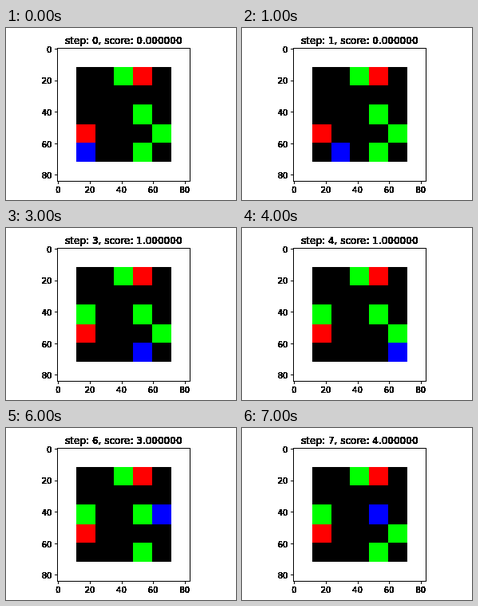
Recreate the animation shown at these times as an HTML page. Size 288 by 216 pixels, loop 8 s.

```html
<!DOCTYPE html>
<html lang="en">
<head>
<meta charset="utf-8">
<title>Grid world</title>
<style>
  html, body { margin: 0; width: 100%; height: 100%; overflow: hidden; background: #fff; }
  svg { display: block; width: 288px; height: 216px; }
  text { font: 10px "DejaVu Sans", sans-serif; fill: #000; }
  #title { font-size: 12px; }
  .text { filter: url(#solid); }
  .cell, .line { shape-rendering: crispEdges; }
  .line { fill: none; stroke: #000; }
</style>
</head>
<body>
<svg viewBox="0 0 288 216">
  <!-- Turns soft glyph edges into solid black. -->
  <filter id="solid" filterUnits="userSpaceOnUse" x="0" y="0" width="288" height="216">
    <feComponentTransfer><feFuncA type="linear" slope="30" intercept="-1"/></feComponentTransfer>
  </filter>
  <rect class="cell" x="88" y="49" width="119" height="119"/>
  <g id="cells"></g>
  <g id="axes"><rect class="line" x="64.5" y="25.5" width="166" height="167"/></g>
  <g id="labels" class="text">
    <text id="title" x="147.3" y="20" text-anchor="middle"></text>
  </g>
</svg>
<script>
const STEP_MS = 1000;
const UNIT = 1.98;
const colEdges = [88, 112, 135, 159, 183, 207];
const rowEdges = [49, 72, 96, 121, 144, 168];
const path = [[0, 4], [1, 4], [2, 4], [3, 4], [4, 4], [4, 3], [4, 2], [3, 2]];
const food = [[2, 0], [3, 2], [4, 3], [3, 4]];
const spawns = [[0, 2], [4, 2], [3, 4], [4, 3]];
const hazards = [[3, 0], [0, 3]];

const byId = id => document.getElementById(id);
const title = byId("title"), cells = byId("cells");
const axes = byId("axes"), labels = byId("labels");

function add(parent, tag, attrs, text = "") {
  const node = document.createElementNS("http://www.w3.org/2000/svg", tag);
  for (const key in attrs) node.setAttribute(key, attrs[key]);
  node.textContent = text;
  parent.append(node);
}

function drawCell([col, row], fill) {
  const x = colEdges[col], y = rowEdges[row];
  add(cells, "rect", {
    class: "cell", x, y, fill,
    width: colEdges[col + 1] - x, height: rowEdges[row + 1] - y
  });
}

function drawTicks() {
  for (let v = 0; v <= 80; v += 20) {
    const x = 65.43 + v * UNIT, y = 26.91 + v * UNIT;
    const tx = Math.round(x) + .5, ty = 215.5 - Math.round(216 - y);
    add(axes, "path", { class: "line", d: `M${tx} 192v4M65 ${ty}h-4` });
    add(labels, "text", { x, y: 207, "text-anchor": "middle" }, v);
    add(labels, "text", { x: 57.4, y: Math.round(y + 3.8), "text-anchor": "end" }, v);
  }
}

// Each meal scores a point and spawns the next piece of food.
let score = 0;
const states = path.map(agent => {
  const eaten = food.findIndex(f => String(f) === String(agent));
  if (eaten >= 0) food[eaten] = spawns[score++];
  return { agent, score, food: [...food] };
});

let shown = -1;
function render(time) {
  const step = Math.floor(time / STEP_MS) % states.length;
  if (step !== shown) {
    shown = step;
    const state = states[step];
    title.textContent = `step: ${step}, score: ${state.score.toFixed(6)}`;
    cells.replaceChildren();
    state.food.forEach(f => drawCell(f, "#0f0"));
    hazards.forEach(h => drawCell(h, "#f00"));
    drawCell(state.agent, "#00f");
  }
  requestAnimationFrame(() => render(performance.now() - start));
}

drawTicks();
const start = performance.now();
render(0);
</script>
</body>
</html>
```
